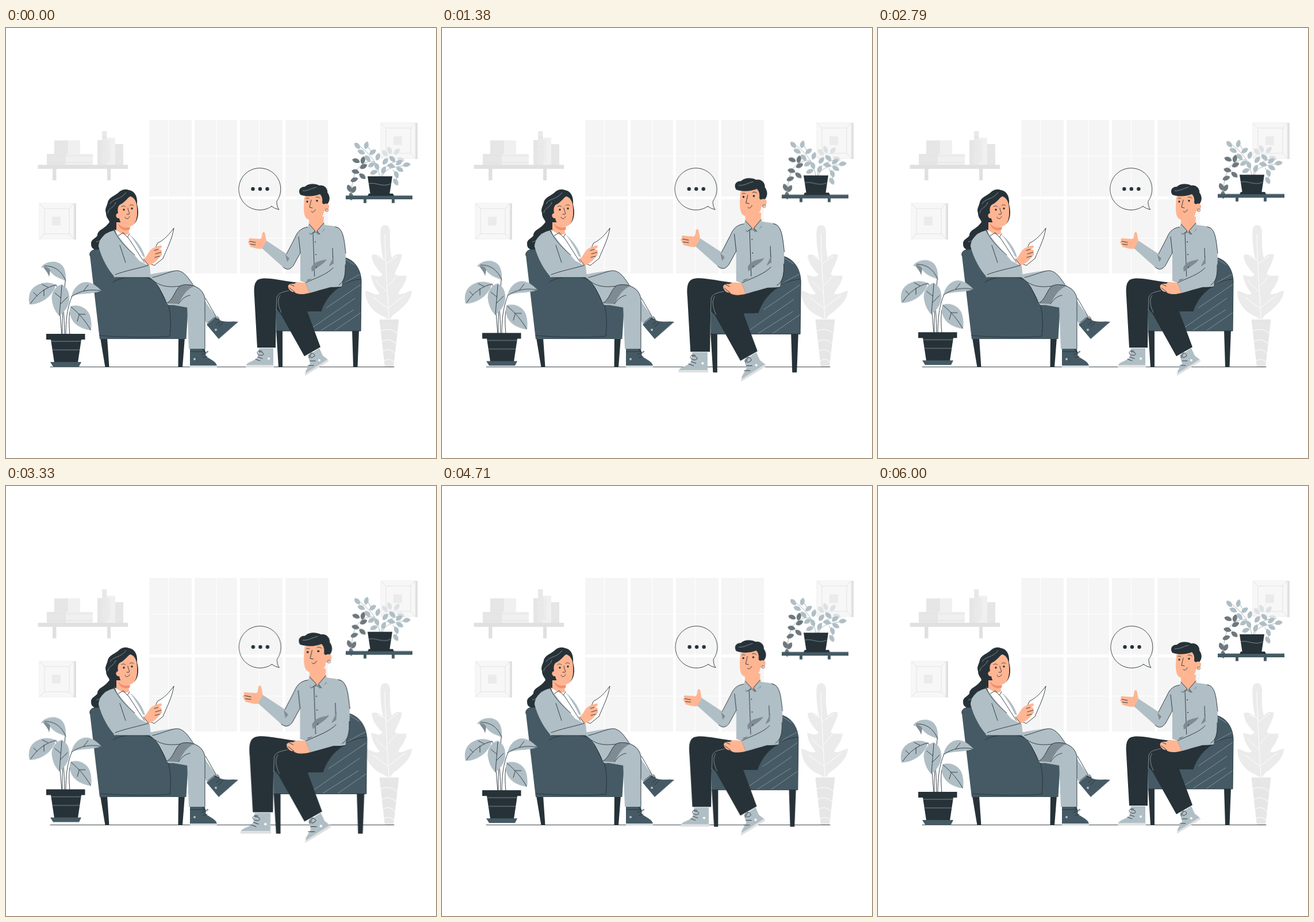
These frames come from a looping animation (748 px wide and 748 px high, 6040 ms). An HTML page:

```html
<!DOCTYPE html>
<html lang="en">
<head>
<meta charset="utf-8">
<title>Conversation</title>
<style>
html, body { margin: 0; width: 100%; height: 100%; overflow: hidden; background: #fff; }
svg { display: block; width: 100%; height: 100%; }
.ink { fill: #263238; }
.slate { fill: #455a64; }
.mist { fill: #b0bec5; }
.shade { fill: #7f8b92; }
.skin { fill: #ffb592; }
.paper { fill: #fff; }
.line { fill: none; stroke: #263238; stroke-width: .9; stroke-linecap: round; stroke-linejoin: round; }
.pale { fill: none; stroke: #fff; stroke-width: 1; }
.faint { fill: none; stroke: #e0e0e0; stroke-width: .9; }
.soft { fill: none; stroke: #92a1a9; stroke-width: .8; }

/* Four 1.5 s bobs, two 3 s pulses and one 6 s shake, each with a 40 ms rest. */
.float { animation: float 6040ms linear infinite; }
.pulse { animation: pulse 6040ms linear infinite; transform-origin: 517px 438px; }
.shake { animation: shake 6040ms linear infinite; }
@keyframes float {
  0%, 24.834%, 49.669%, 74.503%, 99.338%, 100% { transform: translateY(0); }
  12.417%, 37.252%, 62.086%, 86.921% { transform: translateY(-10px); }
}
@keyframes pulse {
  0%, 19.868%, 49.669%, 69.536% { transform: scale(1); }
  14.901%, 29.801%, 64.57%, 79.47%, 99.338%, 100% { transform: scale(1); }
  4.967%, 24.834%, 54.636%, 74.503% { transform: scale(1.1); animation-timing-function: cubic-bezier(.3, .2, .7, 1); }
}
@keyframes shake {
  0%, 99.338%, 100% { transform: translateX(0); }
  9.934%, 89.404% { transform: translateX(-1px); }
  19.868%, 79.47% { transform: translateX(2px); }
  29.801%, 49.669%, 69.536% { transform: translateX(-4px); }
  39.735%, 59.603% { transform: translateX(4px); }
}
</style>
</head>
<body>
<svg viewBox="0 0 748 748">
  <defs>
    <path id="leaf" d="M-7 0C-4 -5 3 -6 7 0C3 5 -4 5 -7 0Z"/>
    <g id="picture">
      <path fill="#e0e0e0" d="M60 0H64V63H60Z"/>
      <path fill="#f7f7f7" stroke="#ebebeb" stroke-width=".8" d="M0 0H60V62H0Z"/>
      <path class="faint" d="M0 0L9 9H52L60 0M9 9V53L0 62M52 9V53L60 62M9 53H52"/>
      <path fill="#ebebeb" d="M22 23.5H37V38.5H22Z"/>
    </g>
  </defs>

  <!-- Room -->
  <path fill="#f5f5f5" d="M249 160H323V427H249ZM328 160H402V427H328ZM407 160H481V427H407ZM486 160H560V427H486Z"/>
  <path class="pale" stroke-width="1.6" d="M282.5 160V427M366 160V427M440.5 160V427M524.5 160V427M249 222.5H560M249 365.5H560"/>
  <path class="paper" d="M249 293H560V298H249Z"/>

  <path fill="#e0e0e0" d="M55.500 238H212V245H55.500ZM81 245H87.500V265H81ZM176 245H182V265H176Z"/>
  <path fill="#e6e6e6" d="M84 195.500H107V219H84ZM71 219H104V238H71ZM159 195H167.500V238H159ZM190 202H204V238H190Z"/>
  <path fill="#f0f0f0" d="M107 195.500H129V219H107ZM104 219H151V238H104ZM175 191H190V238H175Z"/>
  <path fill="#e9e9e9" d="M167 179.500H175.500V238H167Z"/>
  <path class="faint" d="M71 222H151M71 234H151M107 195V219M177 195V234M180 195V234M168 190H175M168 207H175"/>
  <use href="#picture" x="58" y="305"/>
  <use href="#picture" x="652" y="165"/>

  <path fill="#ebebeb" d="M659 343C668 343 669 353 668 363C667 378 669 390 671 400C677 393 684 391 689 395C687 406 681 416 676 428C683 433 690 430 697 431C695 446 687 452 682 462C690 466 699 457 706 457C705 474 692 484 682 493C675 498 671 500 669 506H663C659 502 650 500 643 494C632 485 625 474 625 457C632 457 642 467 650 462C643 453 637 444 635 430C643 430 648 436 655 429C645 419 637 408 636 396C642 391 651 397 656 402C653 388 650 362 652 350C653 345 656 343 659 343Z"/>
  <path class="pale" stroke="#f7f7f7" d="M659 358C660 410 664 465 666 506M665 448L680 431M664 460L643 440M666 486L694 465M665 488L638 468M661 405L646 397M662 410L681 396"/>
  <path fill="#e6e6e6" d="M649.500 507H683.500L674 590H659Z"/>
  <path class="pale" d="M652 527Q666 520 681 531M654 545Q666 538 679 549M656 562Q667 555 677 567M658 579Q667 573 675 581"/>
  <path class="line" d="M77 589.600H675"/>

  <!-- Seated woman -->
  <g>
    <path class="ink" d="M164 539H176L179.500 590H172.500ZM300 539H311L307 590H299.500Z"/>
    <path class="ink" d="M214 282C226 284 229 296 228 307C232 321 230 337 221 342L192 350C189 364 181 380 169 385C158 388 148 386 148 376C147 368 155 367 159 361C159 351 171 350 178 340C184 336 174 333 174 322C171 314 176 310 177 303C179 294 190 292 197 285C203 280 209 280 214 282Z"/>
    <path class="slate" d="M146 396C144 387 154 384 165 385L189 434L250 433C264 441 275 466 282 482H317L313.500 541H163Z"/>
    <path class="line" d="M146 396C144 387 154 384 165 385M163 535C205 538 255 539 285 536M186 442C201 432 238 428 256 439C269 449 274 472 283 484C287 500 287 520 285 536"/>
    <path class="skin" d="M192 338L213 338L214 359C209 363 198 362 192 355Z"/>
    <path fill="#f28f70" d="M195 340C201 348 211 349 216 345L215 351C205 354 197 349 195 340Z"/>
    <path class="skin" d="M195 322C193 311 197 307 201 306C209 301 213 293 217 293C225 296 228 305 228 315C229 330 226 343 216 345C207 347 199 342 197 331C191 332 189 323 195 322Z"/>
    <path class="line" stroke-width="1.100" d="M201 311C203 309 206 309 208 311M215 309C217 307 220 307 222 309M212 313C212 318 216 322 214 324L210 324M207 329C209 333 212 333 215 328"/>
    <circle class="ink" cx="205" cy="316" r="1.700"/><circle class="ink" cx="219" cy="314" r="1.700"/>
    <path class="soft" stroke="#607078" d="M181 306C186 296 200 299 209 286M177 322C178 313 189 312 191 303M157 372C164 372 168 364 174 357"/>
    <path class="paper" d="M188 350L205 360L215 358L232 380L243 400L247 430L221 414Z"/>
    <path class="line" d="M188 350L194 362L204 356L211 364L215 358M212 364C224 381 232 396 241 408"/>
    <path class="mist" d="M188 352L205 374L232 405L250 414L252 434L190 434C178 422 166 400 161 380C162 364 175 355 188 352ZM215 359C227 369 239 385 242 399L238 397C232 383 223 370 215 359Z"/>
    <path class="line" d="M188 352C196 369 209 382 224 395M198 378L208 408M190 434H250M190 429C208 422 231 418 247 413"/>
    <path class="paper line" style="fill:#fff" d="M264 374C275 369 284 359 292 348C289 368 278 388 273 401L258 413L248 409Z"/>
    <path class="skin" d="M239 402C246 398 247 389 254 384C260 380 266 379 270 378C273 381 268 384 264 386C269 384 272 386 270 390C273 393 270 397 266 400C261 407 253 412 247 413Z"/>
    <path class="line" stroke="#d37c60" d="M258 387L265 385M260 393L270 390M259 399L267 397"/>
    <path class="line" d="M239 402L248 413"/>
    <path class="mist" d="M239 430C264 427 282 422 295 422C308 422 316 432 324 444L366 503L350 516L337 490L280 480C275 460 263 442 249 433Z"/>
    <path class="line" d="M255 434C272 430 289 422 298 422C311 423 319 438 325 446M347 470L366 503"/>
    <path class="mist" d="M251 433C276 456 301 444 322 447C341 451 347 463 346 480V558H318L315 482H282C275 463 267 446 251 433Z"/>
    <path class="shade" d="M279 479C292 473 293 455 304 448C315 444 325 447 329 448C312 455 305 471 300 480Z"/>
    <path class="line" d="M279 479C292 473 293 455 304 448C319 443 343 450 346 471V558M300 480C306 471 313 466 320 465M257 440C271 451 286 451 303 449"/>
    <path class="slate" d="M349 516L365 503L371 508C382 513 392 509 404 511L370 541Z"/>
    <path class="line" d="M352 512L363 503M366 516L373 510M370 520L378 512M363 505L371 508C363 498 371 502 371 508"/>
    <path class="soft" stroke="#cfd8dc" d="M371 540L404 511"/>
    <circle class="mist" cx="365" cy="525" r="2"/>
    <path class="slate" d="M320 558H346L348 571C356 577 366 580 367 588H320Z"/>
    <path fill="#cfd8dc" d="M320 587H367V590H320Z"/>
    <path class="line" d="M321 563H346M340 568L347 566M343 573L350 571M347 565C338 557 344 556 347 565C354 558 352 567 347 565"/>
    <circle class="mist" cx="328" cy="576" r="2"/>
  </g>

  <!-- Seated man -->
  <g class="pulse">
    <path class="ink" d="M470 525H481V590H474ZM602 525H614L611.500 590H604Z"/>
    <path class="slate" d="M579 398C602 398 617 416 618 440L617 527H470V488L548 493C553 472 566 455 583 447Z"/>
    <path class="soft" d="M589 401L606 412M575 455C590 441 603 435 617 428M557 487L617 446M526 526L607 470M548 526L605 490M572 526L617 495"/>
    <path class="line" d="M579 398C602 398 617 416 618 440L617 527H470M548 493C553 472 569 453 583 447C598 440 606 438 617 437"/>
    <path class="ink" d="M509 443C481 440 452 432 440 437C431 441 431 453 432 466L437 556H469L470 489L477 496L519 571L547 555L524 493H548C556 472 568 457 585 449Z"/>
    <path class="soft" stroke="#6b7b84" d="M470 492L471 469C473 460 483 459 492 457M479 495C473 483 472 471 477 465"/>
    <path class="mist" d="M440 557H465V586H418C421 580 433 580 438 572Z"/>
    <path fill="#e0e0e0" d="M418 586H466V590H417Z"/>
    <path class="line" d="M438 572L446 575M434 576L442 579M440 563C450 563 451 571 441 569C434 567 437 559 445 562"/>
    <circle class="paper" cx="457" cy="575" r="2"/>
    <path class="mist" d="M525 570L545 557L551 570L560 577L522 602C518 599 526 590 529 583Z"/>
    <path fill="#e0e0e0" d="M560 576L561 580L520 605V601Z"/>
    <path class="line" d="M529 579L538 579M525 587L535 587M528 574C524 565 535 562 537 570C531 576 526 573 532 565"/>
    <circle class="paper" cx="545" cy="578" r="2"/>

    <path class="mist" d="M527 346C515 347 508 352 503 364L488 393L453 370L445 383L482 416C489 422 495 420 500 413L512 391L512 440C531 447 549 453 584 450L587 425C592 418 591 400 590 382C588 358 583 347 573 345L551 342Z"/>
    <path class="line" d="M527 346C515 347 508 352 503 364L488 393M512 391L500 413C495 420 489 422 482 416M512 391L509 363M534 355L537 442M573 346C587 348 588 367 591 392M568 383L569 416C558 429 542 432 524 439M584 450C571 453 551 453 527 461"/>
    <path class="shade" d="M531 417C537 405 546 406 558 402C554 410 544 414 532 424ZM486 394L493 401L489 407ZM562 414L570 397L569 416Z"/>
    <path class="mist" d="M569 410L590 415C590 431 587 443 579 447C562 451 543 457 528 461L521 443Z"/>
    <path class="line" d="M521 443C541 434 559 428 569 417M590 412C591 430 588 442 579 447"/>
    <path class="skin" d="M527 328H553L552 347L540 355L527 347Z"/>
    <path class="shade" d="M527 344L539 355L552 344L554 351L543 360L539 356L528 359Z"/>
    <path class="mist" d="M527 341L538 353L530 359L524 348ZM553 339L541 353L546 359L556 346Z"/>
    <path class="line" d="M527 341L538 353L530 359M553 339L541 353L546 359"/>
    <circle class="ink" cx="538" cy="372" r=".9"/><circle class="ink" cx="539" cy="394" r=".9"/><circle class="ink" cx="540" cy="416" r=".9"/>

    <path class="skin" d="M519 294C526 287 545 282 553 292L555 307C560 302 565 310 560 316C558 319 555 319 553 318C553 331 540 336 529 334C518 333 518 319 518 309Z"/>
    <path class="ink" d="M512 290C507 282 512 276 520 276C527 269 540 271 545 274C554 272 560 280 559 286C565 294 563 302 559 306C554 304 553 309 550 304C551 296 549 292 546 289C536 293 524 294 512 290Z"/>
    <path class="line" stroke-width="1.100" d="M522 297C524 295 526 296 527 297M539 295C541 293 544 294 546 296M531 299L528 312L533 313M531 319C533 322 536 320 538 316"/>
    <circle class="ink" cx="524" cy="302" r="1.700"/><circle class="ink" cx="541" cy="300.500" r="1.700"/>
    <path class="soft" stroke="#607078" d="M516 283C525 284 531 279 540 277"/>
    <circle fill="none" stroke="#607078" cx="558" cy="317" r="2.500" stroke-width=".8"/>
    <path class="skin" d="M453 370L445 384C438 385 431 382 426 381C423 380 425 378 428 379C422 378 421 375 424 375C420 374 420 370 424 370C420 366 424 365 429 366L443 367C447 363 444 356 448 355C451 354 451 362 453 370Z"/>
    <path class="line" stroke="#d37c60" d="M424 371L434 373M425 376L434 377"/>
    <path class="skin" d="M521 443L528 461C516 464 506 464 501 459C496 460 491 454 491 451C489 446 496 444 501 445C507 440 514 443 521 443Z"/>
    <path class="line" stroke="#d37c60" d="M493 452L502 459M495 446L501 449"/>
  </g>

  <!-- Speech bubble -->
  <g class="shake">
    <path class="line" d="M462 310.300A36.500 36.500 0 1 1 471 301.500Q471 311 475 316Q467 314 462 310.300Z"/>
    <g class="ink"><circle cx="429.500" cy="280" r="3.200"/><circle cx="442" cy="280" r="3.200"/><circle cx="454.500" cy="280" r="3.200"/></g>
  </g>

  <!-- Floor plant -->
  <g class="float">
    <path class="line" stroke="#607078" d="M103 440C101 470 97 495 98 534M94 486C94 505 96 520 97 534M115 466C106 487 104 510 104 534M113 486C108 500 110 520 111 534M87 447C101 470 101 500 102 534"/>
    <g class="mist">
      <path d="M104 440C105 423 101 410 87 407C76 405 64 410 61 417C68 416 75 418 77 423C83 433 95 436 104 440Z"/>
      <path d="M87 447C73 439 53 443 44 456C39 464 39 474 41 481C59 481 80 469 87 447Z"/>
      <path d="M97 446C85 449 78 462 80 474C82 488 88 496 93 501C104 492 112 480 110 466C109 456 104 449 97 446Z"/>
      <path d="M114 467C117 452 128 441 141 442C152 443 160 451 166 457C149 464 130 460 114 467Z"/>
      <path d="M113 484C125 480 141 486 146 500C149 510 149 518 148 526C132 524 116 516 112 500C110 493 111 488 113 484Z"/>
    </g>
    <path class="shade" d="M65 416C71 415 76 418 77 422L75 433C73 425 68 421 65 416Z"/>
    <path class="line" stroke="#455a64" d="M104 440C98 425 86 413 67 414M87 447C71 450 54 462 43 479M73 451L63 446M66 455V466M54 466L48 460M97 448C96 465 94 484 93 500M95 469L85 461M95 480L107 468M114 467C130 456 148 454 164 457M135 457L143 447M113 485C128 497 140 512 147 525M126 498L138 498M127 500L124 510"/>
    <path class="ink" d="M70 532H137.500V542H131L125 582H84L78 542H70Z"/>
    <path class="soft" d="M78 545H131M80 560H128"/>
    <path class="slate" d="M77 581H131L127 589H82Z"/>
  </g>

  <!-- Shelf plant -->
  <g class="float">
    <path class="soft" d="M650 258C646 235 635 220 613 204M642 233C632 229 614 237 608 251C603 262 601 277 600 292M653 258C657 238 671 234 686 230M655 258C660 243 675 242 701 238M673 246C679 257 681 263 678 270M638 220L627 202"/>
    <g id="leaves"></g>
    <path class="slate" d="M591 291.500H707V298H591ZM622 298H627V304.500H622ZM671 298H676V304.500H671Z"/>
    <path class="ink" d="M629 258H672L667 291H634ZM631 288H673L675 292H629Z"/>
    <path class="soft" stroke="#60717a" d="M631 271C642 267 655 278 669 271"/>
  </g>
</svg>
<script>
const ns = 'http://www.w3.org/2000/svg';
// Each leaf is x, y, angle.
const leaves = {
  '#dde1e3': [[667, 213, 70], [680, 215, -50], [687, 229, 20], [659, 218, 50]],
  '#b0bec5': [[611, 205, 50], [627, 204, -75], [618, 216, 25], [638, 216, -35], [629, 227, 50],
    [647, 224, -70], [636, 238, -30], [645, 241, 70], [660, 232, -50], [672, 228, 45], [657, 247, -65],
    [670, 240, 15], [684, 234, -35], [697, 238, -8], [685, 246, 30], [679, 255, 70], [678, 268, 60], [640, 251, -20]],
  '#6d787e': [[609, 231, 20], [621, 230, -75], [608, 250, 15], [620, 258, 40], [606, 264, -20],
    [597, 279, 70], [605, 281, -60], [600, 293, 85], [622, 241, -25]]
};
for (const [color, list] of Object.entries(leaves)) {
  for (const [x, y, angle] of list) {
    const leaf = document.createElementNS(ns, 'use');
    leaf.setAttribute('href', '#leaf');
    leaf.setAttribute('fill', color);
    leaf.setAttribute('transform', `translate(${x} ${y}) rotate(${angle})`);
    document.getElementById('leaves').append(leaf);
  }
}
</script>
</body>
</html>
```
